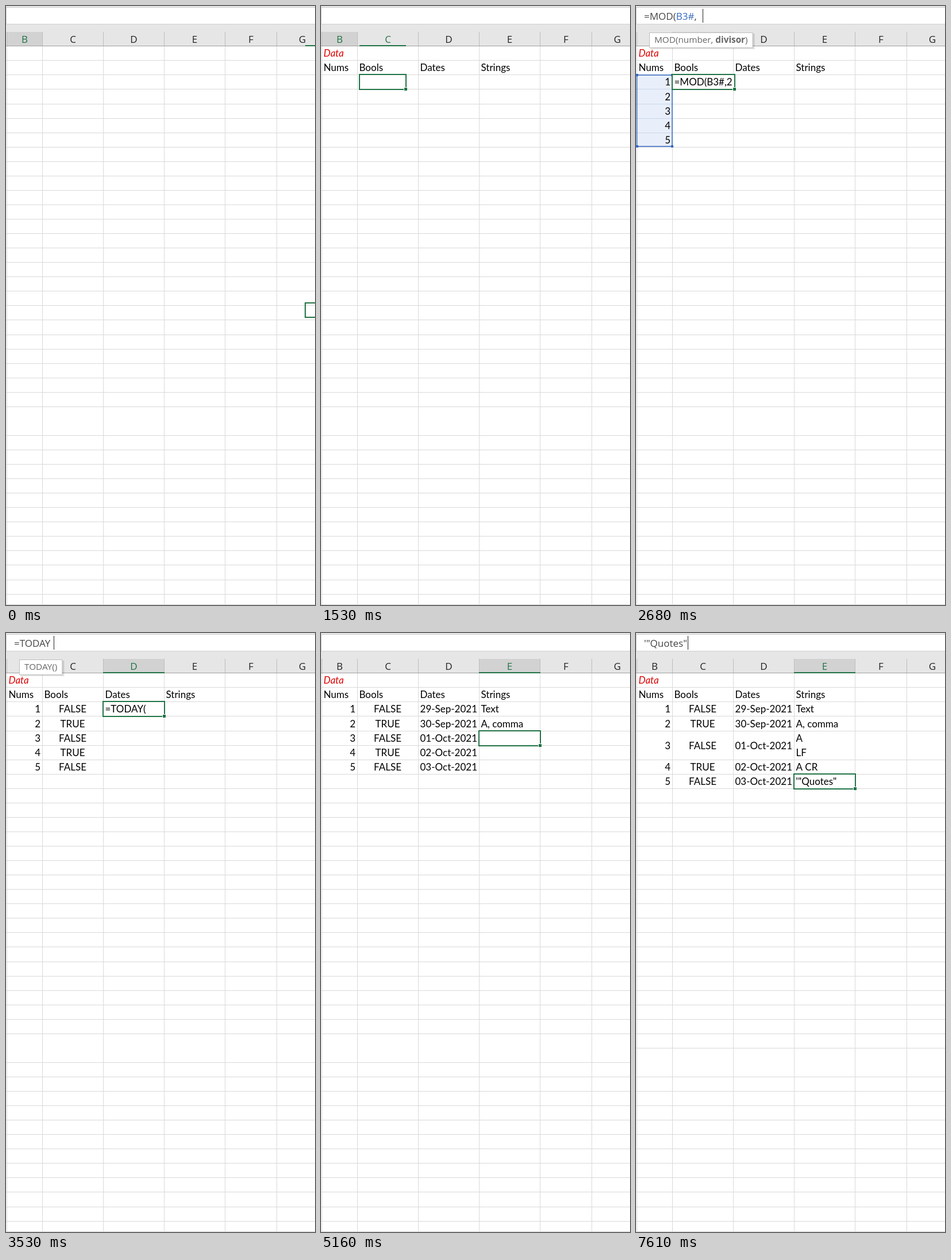
These frames come from a looping animation (538 px wide and 1041 px high, 8000 ms). An HTML page with a canvas:

```html
<!DOCTYPE html>
<html lang="en">
<head>
<meta charset="utf-8">
<title>Spreadsheet entry</title>
<style>
html, body { margin: 0; width: 100%; height: 100%; overflow: hidden; background: #fff; }
canvas { display: block; }
</style>
</head>
<body>
<canvas id="stage" width="538" height="1041"></canvas>
<script>
const ctx = document.getElementById('stage').getContext('2d');
const LOOP = 8000, GREEN = '#217346', BLUE = '#3569c0';
const CELL = '17px Lato, Carlito, sans-serif';
const UI = '17px "Open Sans", "Noto Sans", sans-serif';
const TIP = '15.3px "Open Sans", "Noto Sans", sans-serif';
const cols = { B: [1, 63], C: [63, 169], D: [169, 275], E: [275, 381], F: [381, 471], G: [471, 561] };
const spots = { far: [521, 516, 621, 540], mid: [67, 119, 147, 144] };
const TALL_AT = 5690;

// [time, cell or "from>to progress", text being typed]
const keys = [
  [0, 'far>B1 0'], [70, 'far>B1 .45'], [130, 'far>B1 .75'], [200, 'far>B1 .93'], [270, 'B1'],
  [400, 'B1', 'Da'], [470, 'B1', 'Dat'], [530, 'B1', 'Data'], [600, 'B1>B2 .6'], [660, 'B2'],
  [800, 'B2', 'N'], [860, 'B2', 'Nu'], [910, 'B2', 'Nums'],
  [970, 'B2>C2 .6'], [1030, 'C2', 'Bo'], [1090, 'C2', 'Bools'],
  [1160, 'C2>D2 .6'], [1220, 'D2', 'Dat'], [1290, 'D2', 'Dates'],
  [1350, 'E2', 'Str'], [1440, 'E2', 'Strings'],
  [1530, 'mid>B3 0'], [1600, 'mid>B3 .7'], [1670, 'B3'],
  [1730, 'B3', '=S'], [1800, 'B3', '=SEQ'], [1860, 'B3', '=SEQUENCE('],
  [1930, 'B3', '=SEQUENCE(5'], [1990, 'B3', '=SEQUENCE(5)'],
  [2130, 'B3>C3 .6'], [2200, 'C3'], [2260, 'C3', '=M'], [2330, 'C3', '=MOD('],
  [2400, 'C3', '=MOD(B'], [2460, 'C3', '=MOD(B3'], [2530, 'C3', '=MOD(B3#'],
  [2600, 'C3', '=MOD(B3#,'], [2680, 'C3', '=MOD(B3#,2'], [2750, 'C3', '=MOD(B3#,2)='],
  [2810, 'C3', '=MOD(B3#,2)=0'],
  [2950, 'C3>D3 .6'], [3020, 'D3'], [3200, 'D3', '='], [3260, 'D3', '=T'], [3330, 'D3', '=TO'],
  [3400, 'D3', '=TOD'], [3460, 'D3', '=TODAY'], [3530, 'D3', '=TODAY('], [3590, 'D3', '=TODAY()'],
  [3670, 'D3', '=TODAY()+'], [3740, 'D3', '=TODAY()+B'], [3800, 'D3', '=TODAY()+B3#'],
  [3860, 'D3>E3 .6'], [3930, 'D3>E3 .9'], [3990, 'E3'],
  [4320, 'E3', 'Te'], [4400, 'E3', 'Text'], [4460, 'E3>E4 .6'], [4530, 'E4'],
  [4620, 'E4', 'A'], [4700, 'E4', 'A,'], [4790, 'E4', 'A, c'], [4870, 'E4', 'A, com'],
  [4940, 'E4', 'A, comma'], [5080, 'E4>E5 .6'], [5160, 'E5'],
  [5340, 'E5', 'A'], [5410, 'E5', 'A\n'], [5480, 'E5', 'A\nL'], [5560, 'E5', 'A\nLF'],
  [TALL_AT, 'E5>E6 .3'], [5750, 'E5>E6 .6'], [5820, 'E5>E6 .9'], [5890, 'E6'],
  [6420, 'E6', '='], [6490, 'E6', '="A'], [6560, 'E6', '="A"&'], [6640, 'E6', '="A"&CH'],
  [6710, 'E6', '="A"&CHAR'], [6780, 'E6', '="A"&CHAR('], [6860, 'E6', '="A"&CHAR(1'],
  [7010, 'E6>E7 .6'], [7080, 'E6>E7 .9'], [7140, 'E7'],
  [7480, 'E7', '\'"'], [7540, 'E7', '\'"Quo'], [7610, 'E7', '\'"Quotes"']
];

// [time, first cell, values going down]
const entries = [
  [600, 'B1', ['Data']], [970, 'B2', ['Nums']], [1160, 'C2', ['Bools']],
  [1350, 'D2', ['Dates']], [1530, 'E2', ['Strings']],
  [2130, 'B3', ['1', '2', '3', '4', '5']],
  [2950, 'C3', ['FALSE', 'TRUE', 'FALSE', 'TRUE', 'FALSE']],
  [3860, 'D3', ['29-Sep-2021', '30-Sep-2021', '01-Oct-2021', '02-Oct-2021', '03-Oct-2021']],
  [4460, 'E3', ['Text']], [5080, 'E4', ['A, comma']], [TALL_AT, 'E5', ['A\nLF']], [7010, 'E6', ['A CR']]
];

const tips = {
  SEQUENCE: ['rows', '[columns]', '[start]', '[step]'],
  MOD: ['number', 'divisor'], TODAY: [], CHAR: ['number']
};

let tall = false;

function box(x, y, w, h, color) {
  ctx.fillStyle = color;
  ctx.fillRect(x, y, w, h);
}

function write(text, x, y, font, color, align = 'left') {
  ctx.font = font;
  ctx.fillStyle = color;
  ctx.textAlign = align;
  ctx.fillText(text, x, y);
  return x + ctx.measureText(text).width;
}

// Bottom line of a row; row 26 is double height, row 5 becomes so
function edge(row) {
  const units = row + (tall && row >= 5) + (row >= 26);
  return Math.round(69.3 + 25.06 * units);
}

function rect(name) {
  if (spots[name]) return spots[name];
  const [x0, x1] = cols[name[0]], row = +name.slice(1);
  return [x0, edge(row - 1), x1, edge(row)];
}

function selection(spec) {
  const [path, p] = spec.split(' '), [from, to = from] = path.split('>');
  const a = rect(from), b = rect(to);
  return { to, area: a.map((v, i) => Math.round(v + (b[i] - v) * (p || 0))) };
}

function drawGrid() {
  box(0, 0, 538, 1041, '#fff');
  for (let r = 1; edge(r) < 1041; r++) box(0, edge(r), 538, 1, '#d9d9d9');
  box(0, 1040, 538, 1, '#d0d0d0');
  for (const c in cols) box(cols[c][0], 70, 1, 971, '#d9d9d9');
}

function drawHeader(to, [x0, , x1]) {
  box(0, 0, 538, 70, '#e6e6e6');
  box(0, 2, 538, 30, '#cfcfcf');
  box(1, 3, 537, 28, '#fff');
  for (const c in cols) {
    const [a, b] = cols[c], on = c === to[0], centre = (a + b) / 2;
    if (on) box(a, 45, b - a, 24, '#d2d2d2');
    box(a, 45, 1, 24, '#bdbdbd');
    const green = on || (centre > x0 && centre < x1);
    write(c, c === 'G' ? 516 : centre + .5, 64, UI, green ? GREEN : '#222', 'center');
  }
  box(0, 69, 538, 1, '#a0a0a0');
  box(x0, 68, x1 - x0 + 1, 2, GREEN);
}

function drawCell(name, text) {
  const [x0, y0, x1, y1] = rect(name), data = +name.slice(1) > 2;
  const lines = text.split('\n'), [align, x] = !data || name[0] === 'E' ? ['left', x0 + 3.5]
    : name[0] === 'C' ? ['center', 116] : ['right', x1 - 3];
  const title = name === 'B1';
  lines.forEach((line, i) => {
    const y = Math.round((y0 + y1) / 2 + 6.6 + 25 * (i - (lines.length - 1) / 2));
    write(line, x, y, (title ? 'italic ' : '') + CELL, title ? '#e00000' : '#000', align);
  });
}

function drawReference() {
  box(2, 120, 61, 124, '#e9effa');
  for (let r = 3; r < 7; r++) box(2, edge(r), 61, 1, '#ccd6e8');
  ctx.strokeStyle = BLUE;
  ctx.lineWidth = 1.5;
  ctx.strokeRect(1.5, 120, 61.5, 124);
  for (const x of [0, 61]) for (const y of [118, 242]) box(x, y, 4, 4, BLUE);
}

function drawSelection([x0, y0, x1, y1], text, name) {
  if (text) {
    const lines = text.split('\n'), font = (name === 'B1' ? 'italic ' : '') + CELL;
    ctx.font = font;
    x1 = Math.max(x1, Math.ceil(x0 + 6 + ctx.measureText(lines[0]).width));
    y1 += 25 * (lines.length - 1);
    box(x0, y0, x1 - x0 + 1, y1 - y0 + 1, '#fff');
    const y = Math.round(y0 + 19.1);
    lines.forEach((line, i) =>
      write(line, x0 + 3.5, y + 25 * i, font, name === 'B1' ? '#e00000' : '#000'));
  }
  ctx.strokeStyle = GREEN;
  ctx.lineWidth = 2;
  ctx.strokeRect(x0, y0, x1 - x0 + 1, y1 - y0 + 1);
  box(x1 - 3, y1 - 3, 6, 6, '#fff');
  box(x1 - 2, y1 - 2, 5, 5, GREEN);
}

// The text in the bar trails the caret by one letter while typing goes on
function drawBar(text, lagging) {
  const line = text.split('\n').pop();
  let x = 14;
  for (const part of (lagging ? line.slice(0, -1) : line).split(/(B3#?)/))
    x = write(part, x, 24, UI, part.startsWith('B3') ? BLUE : '#444');
  ctx.font = UI;
  box(Math.round(15 + ctx.measureText(line).width), 5, 1, 24, '#222');
}

function drawTip(text) {
  const call = text.match(/([A-Z]+)\(([^)]*)$/);
  if (!call) return;
  const args = tips[call[1]], now = call[2].split(',').length - 1;
  const parts = [call[1] + '('];
  args.forEach((arg, i) => parts.push(arg, i < args.length - 1 ? ', ' : ''));
  parts.push(')');
  const font = i => (i === now * 2 + 1 && args.length ? 'bold ' : '') + TIP;
  const width = parts.reduce((sum, part, i) => {
    ctx.font = font(i);
    return sum + ctx.measureText(part).width;
  }, 18);
  box(25, 48, width + 1, 27, 'rgba(0,0,0,.12)');
  box(23, 46, width, 27, '#bebebe');
  box(24, 47, width - 2, 25, '#fff');
  let x = 32;
  parts.forEach((part, i) => { x = write(part, x, 64, font(i), '#666'); });
}

function draw(t) {
  const next = keys.findIndex(k => k[0] > t);
  const at = next < 0 ? keys.length - 1 : next - 1;
  const [start, spec, text = ''] = keys[at];
  tall = t >= TALL_AT;
  const { to, area } = selection(spec);
  drawGrid();
  drawHeader(to, area);
  if (text.includes('B3#')) drawReference();
  for (const [time, first, values] of entries)
    if (t >= time) values.forEach((v, i) => drawCell(first[0] + (+first[1] + i), v));
  drawSelection(area, text, to);
  if (text) {
    drawBar(text, at + 1 < keys.length && keys[at + 1][0] - start < 100);
    drawTip(text);
  }
}

function tick() {
  draw(performance.now() % LOOP);
  requestAnimationFrame(tick);
}
tick();
</script>
</body>
</html>
```
